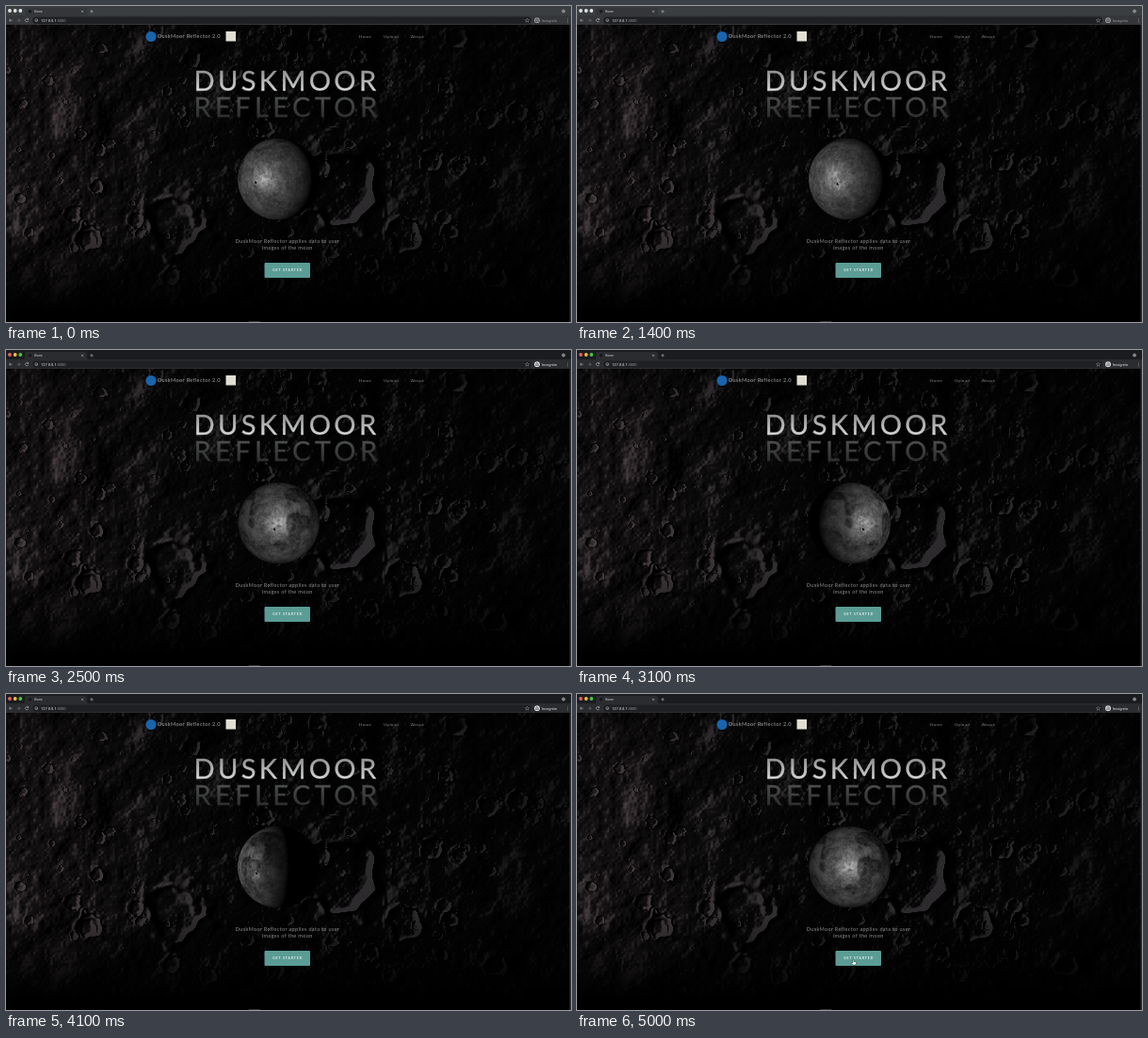
An HTML page with a canvas that plays this animation: 600 px wide and 336 px high, repeating every 5.1 s.

```html
<!DOCTYPE html>
<html lang="en">
<head>
<meta charset="utf-8">
<title>Home</title>
<style>
  html, body { margin: 0; width: 100%; height: 100%; overflow: hidden; background: #000; }
  #stage { position: relative; width: 600px; height: 336px; overflow: hidden; }
  #stage > * { position: absolute; left: 0; top: 0; display: block; }
  #moon { left: 245px; top: 139px; }
  .page { font-family: Lato, "Open Sans", sans-serif; }
  .ui { font-family: Roboto, Arial, sans-serif; }
  .title { font-size: 29px; }
  .copy { font-size: 5.6px; letter-spacing: .3px; fill: #8c8c8c; }
  .nav { font-size: 4.4px; letter-spacing: .4px; fill: #858585; }
</style>
</head>
<body>
<div id="stage">
  <canvas id="ground" width="600" height="336"></canvas>
  <canvas id="moon" width="90" height="90"></canvas>
  <svg width="600" height="336" viewBox="0 0 600 336">
    <defs>
      <linearGradient id="bright" gradientUnits="userSpaceOnUse" x1="0" y1="68" x2="0" y2="91">
        <stop offset="0" stop-color="#8e908f"/><stop offset="1" stop-color="#d6d8d7"/>
      </linearGradient>
      <linearGradient id="faded" gradientUnits="userSpaceOnUse" x1="0" y1="96" x2="0" y2="119">
        <stop offset="0" stop-color="#4c4e4e"/><stop offset="1" stop-color="#2c2d2e"/>
      </linearGradient>
    </defs>

    <rect x="598.5" y="20" width="1.5" height="316" fill="#2a2b2d"/>
    <rect x="258" y="335" width="12" height="1" fill="#303132"/>

    <g class="ui">
      <rect id="strip" width="600" height="10.5"/>
      <g id="bar">
        <path d="M18 10.5q2 0 2-2V4q0-2 2-2H84q2 0 2 2V8.5q0 2 2 2z"/>
        <rect y="10" width="600" height="10"/>
      </g>
      <rect x="28" y="11.5" width="530" height="7.5" rx="3.7" fill="#1f2023"/>
      <g id="lights"><circle cx="4" cy="5" r="1.9"/><circle cx="9.7" cy="5" r="1.9"/><circle cx="15.3" cy="5" r="1.9"/></g>
      <circle cx="25.5" cy="5.8" r="1.7" fill="#17181a"/>
      <text x="30" y="7" font-size="3.3" fill="#d4d5d7">Home</text>
      <g fill="none" stroke="#b6b8bb" stroke-width=".6">
        <path d="M80 4.700l2.200 2.200m0-2.200l-2.200 2.200M89.300 5.800h3.400m-1.700-1.700v3.400"/>
        <path d="M12 15.200H8.800m1.500-1.600l-1.600 1.600 1.600 1.600" transform="translate(-5.300 0)"/>
        <path d="M11.800 15.200H15m-1.500-1.600l1.600 1.600-1.600 1.600" stroke="#77797c"/>
        <path d="M23.600 14.300a1.700 1.700 0 1 0 .1 1.500m0-2.800v1.500h-1.500"/>
        <circle cx="32.300" cy="15.200" r="1.400"/>
        <path d="M32.300 15v.9"/>
        <circle cx="592" cy="5.500" r="1.500" fill="#77797c"/>
      </g>
      <text x="37" y="16.700" font-size="4" fill="#e8eaed">127.0.0.1<tspan fill="#8c8f93">:5000</tspan></text>
      <path d="M553.500 13.300l.6 1.400 1.500.1-1.200 1 .4 1.500-1.300-.8-1.300.8.4-1.500-1.200-1 1.500-.1z" fill="none" stroke="#a4a6a9" stroke-width=".4"/>
      <g id="badge">
        <circle cx="564" cy="15.200" r="2.900" fill="#e4e6e8"/>
        <path d="M562 15h4m-2.800-.4l.3-1.100h1l.3 1.100" stroke="#35363a" stroke-width=".5" fill="none"/>
        <circle cx="563" cy="16.300" r=".7" fill="#35363a"/><circle cx="565" cy="16.300" r=".7" fill="#35363a"/>
        <text x="568.800" y="16.600" font-size="3.9" fill="#e8eaed">Incognito</text>
      </g>
      <g fill="#b6b8bb"><circle cx="596.300" cy="13.400" r=".45"/><circle cx="596.300" cy="15.200" r=".45"/><circle cx="596.300" cy="17" r=".45"/></g>
    </g>

    <g class="page">
      <circle cx="154" cy="32.500" r="5.500" fill="#1864ad"/>
      <text x="161" y="34.200" font-size="5.6" letter-spacing=".36" fill="#a5a6a6">DuskMoor Reflector 2.0</text>
      <rect x="233.500" y="27" width="10.500" height="10.500" fill="#e2dfd2"/>
      <g class="nav"><text x="375" y="33.700">Home</text><text x="401" y="33.700">Upload</text><text x="430" y="33.700">About</text></g>
      <g class="title" stroke-width=".3">
        <text x="199.500" y="90" letter-spacing="3.4" fill="url(#bright)" stroke="url(#bright)">DUSKMOOR</text>
        <text x="199.500" y="118" letter-spacing="4.4" fill="url(#faded)" stroke="url(#faded)">REFLECTOR</text>
      </g>
      <g class="copy" text-anchor="middle">
        <text x="299" y="252">DuskMoor Reflector applies data to user</text>
        <text x="298.700" y="258.500">images of the moon</text>
      </g>
      <rect x="274.500" y="273" width="48.500" height="16" rx="1" fill="#5b9c95"/>
      <text x="299.200" y="282.200" text-anchor="middle" font-size="3.3" font-weight="700" letter-spacing=".97" fill="#f1f6f5">GET STARTED</text>
    </g>

    <g id="cursor">
      <path id="arrow" d="M0 0v5l1.200-1.100.8 1.800.8-.4-.8-1.700h1.600z" fill="#000" stroke="#ddd" stroke-width=".35"/>
      <path id="hand" d="M0 0q.7-.5 1 .2v1.700l2.100.5q.7.3.5 1.100l-.6 2H.2l-1.600-2q0-.8.8-.6l.6.5z" fill="#fff" stroke="#111" stroke-width=".4"/>
    </g>
  </svg>
</div>
<script>
const LOOP = 5100, STEP = 100, FOCUS = 1500, DRAG = 2500;
const RAD = Math.PI / 180;
const $ = id => document.getElementById(id);
const clamp = (v, lo = 0, hi = 1) => Math.min(hi, Math.max(lo, v));
const mix = (a, b, k) => a + (b - a) * k;
const bell = (v, mid, w) => Math.exp(-(((v - mid) / w) ** 2));
const smooth = f => f * f * (3 - 2 * f);
const ease = (t, from, to) => smooth(clamp((t - from) / (to - from)));

function hash(x, y, z) {
  let n = Math.imul(x, 374761393) ^ Math.imul(y, 668265263) ^ Math.imul(z, 1440662683);
  n = Math.imul(n ^ n >>> 13, 1274126177);
  return ((n ^ n >>> 16) >>> 0) / 2 ** 32;
}

function noise(x, y, z) {
  const i = Math.floor(x), j = Math.floor(y), k = Math.floor(z);
  const u = smooth(x - i), v = smooth(y - j), w = smooth(z - k);
  const row = (b, c) => mix(hash(i, b, c), hash(i + 1, b, c), u);
  const plane = c => mix(row(j, c), row(j + 1, c), v);
  return mix(plane(k), plane(k + 1), w);
}

// Cratered terrain: build heights, then light the slopes that face left
function paintGround() {
  const W = 600, H = 336, h = new Float32Array(W * H);
  for (let y = 0; y < H; y++) for (let x = 0; x < W; x++) {
    let s = 0;
    for (let w = 40; w > 2; w /= 2.4) s += noise(x / w, y / w, w) * w * .26;
    h[y * W + x] = s;
  }
  const stamp = (cx, cy, r) => {
    const m = r * 1.6;
    for (let y = Math.max(0, Math.floor(cy - m)); y < Math.min(H, cy + m); y++)
      for (let x = Math.max(0, Math.floor(cx - m)); x < Math.min(W, cx + m); x++) {
        const ragged = 1 + .6 * (noise(x * 2.2 / r, y * 2.2 / r, cx) - .5);
        const d = Math.hypot(x - cx, y - cy) / r * ragged;
        const bowl = d < 1 ? -.26 * (1 - d ** 4) : 0;
        h[y * W + x] += r * (bowl + .12 * bell(d, 1, .25));
      }
  };
  for (let i = 0; i < 240; i++)
    stamp(hash(i, 1, 7) * W, hash(i, 2, 7) * H, 1.6 + 10 * hash(i, 3, 7) ** 4);
  stamp(180, 231, 27);
  stamp(88, 246, 14);
  stamp(350, 190, 38);
  stamp(424, 243, 17);

  const ctx = $('ground').getContext('2d'), img = ctx.createImageData(W, H);
  for (let y = 0; y < H; y++) for (let x = 0; x < W; x++) {
    const i = y * W + x;
    const dx = x < W - 1 ? h[i + 1] - h[i] : 0;
    const dy = y < H - 1 ? h[i + W] - h[i] : 0;
    const slope = dx + .4 * dy;
    const left = clamp((260 - x) / 220);
    const flat = (4 + 12 * left) * clamp(1 + 2 * slope, 0, 1.6);
    const peak = 75 * clamp(slope - .16, 0, .5) * mix(1, .45, clamp((x - 440) / 130));
    const fade = clamp((324 - y) / 90) * mix(.75, 1, clamp((y - 20) / 80));
    const lum = (flat + peak) * fade;
    img.data.set([lum * (1 + .1 * left), lum * .96, lum, 255], i * 4);
  }
  ctx.putImageData(img, 0, 0);
}

// Rough highlands, with dark plains gathered on the near northern side
function albedo(x, y, z) {
  const at = (f, o) => noise(x * f + o, y * f + o, z * f + o) - .5;
  const plains = clamp((at(2.7, 31) + .35 * at(8, 5) + .06) * 7) * clamp(z * 1.3 - y * .9 + .1);
  const ray = bell(Math.hypot(x + .1, y - .7, z - .7), 0, .16);
  return Math.max(.2, .8 + .3 * at(5, 9) + .3 * at(13, 40) + .28 * at(27, 80) - .34 * plains + .3 * ray);
}

const R = 43.5, moonCtx = $('moon').getContext('2d'), moonImg = moonCtx.createImageData(90, 90);

function paintMoon(phase, spin) {
  const ls = -Math.sin(phase), lc = Math.cos(phase);
  const gs = -Math.sin(phase / 2), gc = Math.cos(phase / 2);
  const c = Math.cos(spin), s = Math.sin(spin);
  const gloss = 70 + 25 * lc;
  for (let j = 0; j < 90; j++) for (let i = 0; i < 90; i++) {
    const px = i + .5 - 44.5, py = j + .5 - 45, d = Math.hypot(px, py), o = (j * 90 + i) * 4;
    const cover = clamp(R + .5 - d);
    let lum = 0;
    if (cover) {
      const k = d > R ? R / d : 1, x = px * k / R, y = py * k / R;
      const z = Math.sqrt(Math.max(0, 1 - x * x - y * y));
      const lit = x * ls + z * lc;
      if (lit > 0) {
        const shine = clamp(x * gs + z * gc) ** 20;
        lum = albedo(x * c + z * s, y, z * c - x * s) * (92 * lit ** .65 + gloss * shine);
      }
    }
    moonImg.data.set([lum, lum, lum, 255 * cover], o);
  }
  moonCtx.putImageData(moonImg, 0, 0);
}

function render(time) {
  const t = Math.floor(time % LOOP / STEP) * STEP;
  const dragging = t >= DRAG;

  // Drag right, then left past the middle, then back
  const swing = ease(t, DRAG, 3100) - 2 * ease(t, 3400, 4100) + ease(t, 4200, 4800);
  const phase = dragging ? -swing * (swing > 0 ? 41 : 76) : 36;
  const spin = dragging ? phase : 149 + .037 * t;
  paintMoon(phase * RAD, spin * RAD);

  const active = t >= FOCUS;
  $('strip').setAttribute('fill', active ? '#1b1c20' : '#3b3e41');
  $('bar').setAttribute('fill', active ? '#2b2c2f' : '#35363a');
  $('badge').setAttribute('opacity', active ? 1 : .55);
  const tints = active ? ['#f25f57', '#f6bd3b', '#45c64a'] : Array(3).fill('#e4e5e6');
  [...$('lights').children].forEach((el, i) => el.setAttribute('fill', tints[i]));

  const drift = ease(t, 800, 1900), leave = ease(t, 4500, 5000);
  const x = mix(264, 284, drift) + 19 * swing + 9 * leave;
  const y = mix(185, 188, drift) + 94.5 * leave;
  const onButton = y > 273;
  $('cursor').setAttribute('transform', `translate(${x} ${y})`);
  $('arrow').setAttribute('visibility', onButton ? 'hidden' : 'visible');
  $('hand').setAttribute('visibility', onButton ? 'visible' : 'hidden');
}

paintGround();
const start = performance.now();
let last = -1;
function tick() {
  const time = performance.now() - start, step = Math.floor(time / STEP);
  if (step !== last) { last = step; render(time); }
  requestAnimationFrame(tick);
}
tick();
</script>
</body>
</html>
```
